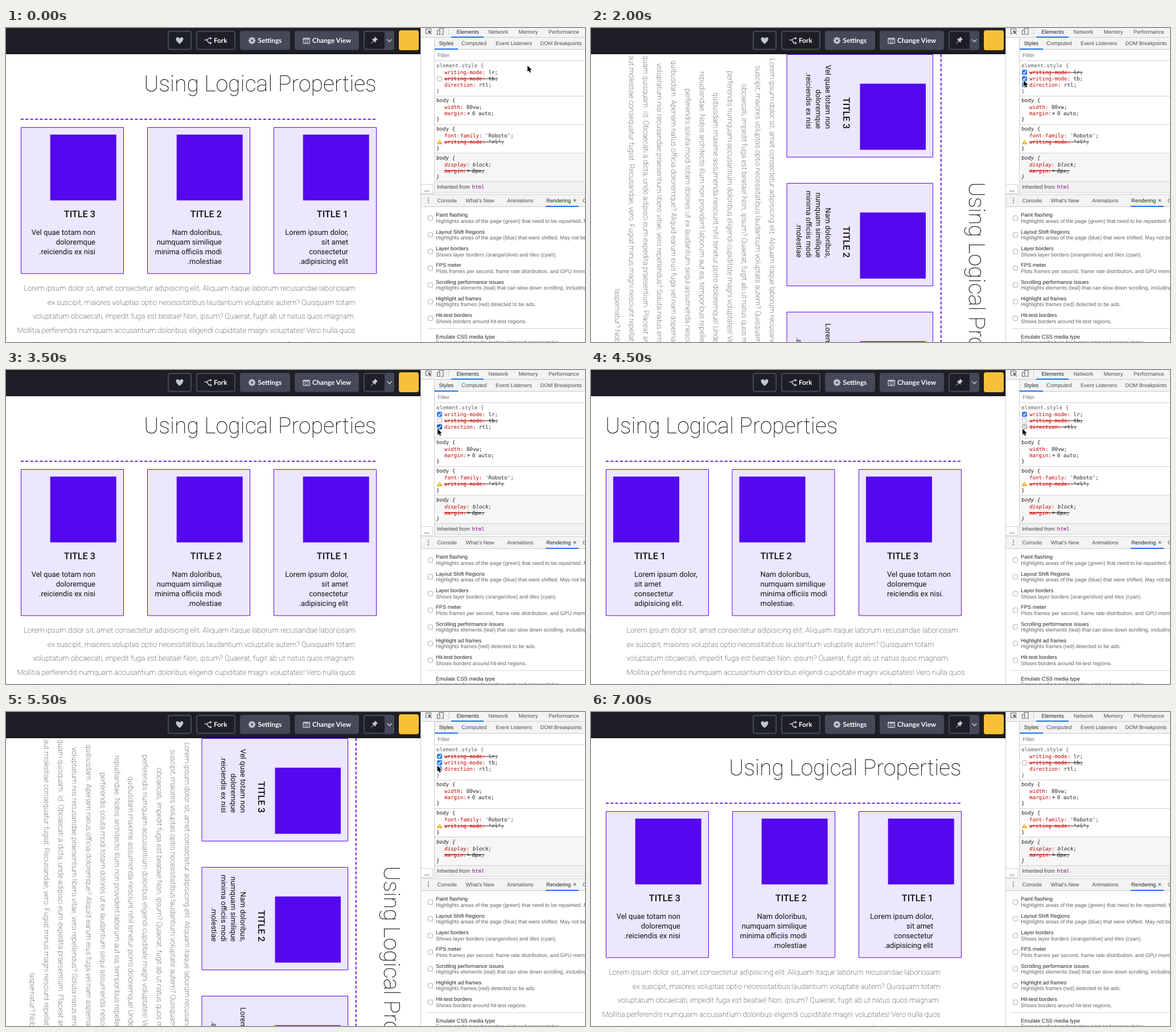
Write an HTML page with a canvas that moves like this. It is 1017 px wide and 551 px high and loops after 7500 ms.

```html
<!DOCTYPE html>
<html lang="en">
<head>
<meta charset="utf-8">
<title>Writing modes and direction</title>
<style>
html, body { margin: 0; width: 100%; height: 100%; overflow: hidden; background: #fff; }
canvas { display: block; }
</style>
</head>
<body>
<canvas id="stage" width="1017" height="551"></canvas>
<script>
const ctx = document.getElementById('stage').getContext('2d');
const LOOP = 7500;
const SANS = '"Liberation Sans", Arial, sans-serif';
const MONO = '"DejaVu Sans Mono", monospace';
const PAGE = 'Roboto, sans-serif';
const PURPLE = '#5408ee', RED = '#c80000', INK = '#222', BLUE = '#1a73e8';

// [start time, value...]; the last entry already reached applies
const MODES = [[0, 'rtl'], [2000, 'tb'], [2750, 'rtl'], [3750, 'ltr'], [4750, 'rtl'], [5500, 'tb'], [6250, 'rtl']];
const POINTER = [
  [0, 916, 66], [250, 878, 85], [500, 824, 85], [750, 771, 88], [1000, 770, 88], [1250, 760, 92],
  [3000, 757, 103], [3250, 758, 103], [5000, 758, 96], [5250, 758, 95], [5500, 757.5, 94],
  [6750, 966, 51], [7000, -50, -50]
];
const PRESSES = [[0, ''], [1750, 'tb'], [2000, ''], [3500, 'dir'], [3750, ''], [4500, 'dir'], [4750, '']];
const at = (list, t) => list.filter(e => e[0] <= t).pop();

const CARDS = [
  ['TITLE 1', 'Lorem ipsum dolor,', 'sit amet', 'consectetur', 'adipisicing elit.'],
  ['TITLE 2', 'Nam doloribus,', 'numquam similique', 'minima officiis modi', 'molestiae.'],
  ['TITLE 3', 'Vel quae totam non', 'doloremque', 'reiciendis ex nisi.']
];
const LINES = [
  'Lorem ipsum dolor sit, amet consectetur adipisicing elit. Aliquam itaque laborum recusandae laboriosam',
  'ex suscipit, maiores voluptas optio necessitatibus laudantium voluptate autem? Quisquam totam',
  'voluptatum obcaecati, impedit fuga est beatae! Non, ipsum? Quaerat, fugit ab ut natus quos magnam.',
  'Mollitia perferendis numquam accusantium doloribus eligendi cupiditate magni voluptates! Vero nulla quos',
  'quibusdam maxime assumenda nesciunt nihil tenetur porro doloremque! Unde perferendis repudiandae.'
];
const COLUMNS = [
  [53, LINES[0]],
  [66, 'suscipit, maiores voluptas optio necessitatibus laudantium voluptate autem? Quisquam totam voluptatum'],
  [98, 'obcaecati, impedit fuga est beatae! Non, ipsum? Quaerat, fugit ab ut natus quos magnam. Mollitia'],
  [75, 'perferendis numquam accusantium doloribus eligendi cupiditate magni voluptates! Vero nulla quos'],
  [113, 'quibusdam maxime assumenda nesciunt nihil tenetur porro doloremque! Unde perferendis'],
  [76, 'repudiandae. Nobis architecto illum non provident laborum aut ea, temporibus repellendus'],
  [106, 'perferendis soluta modi totam dolores ut ex laudantium sequi assumenda nesciunt'],
  [57, 'quibusdam. Aperiam natus officia doloremque? Aliquid earum eius fuga vel nam aspernatur'],
  [62, 'voluptatum nisi recusandae praesentium libero vitae, vero repellendus? Soluta natus error'],
  [48, 'quam quisquam. Id. Obcaecati a dicta, unde adipisci eum expedita praesentium. Placeat animi'],
  [48, 'aut molestiae consequatur fugiat. Recusandae, vero. Fugiat minus magni nesciunt repellat sit'],
  [457, '!aspernatur? Nobis magni']
];

function text(s, x, y, font, color = INK, align = 'left') {
  ctx.font = font;
  ctx.fillStyle = color;
  ctx.textAlign = align;
  ctx.fillText(s, x, y);
}

function box(x, y, w, h, color) {
  ctx.fillStyle = color;
  ctx.fillRect(x, y, w, h);
}

function round(x, y, w, h, r, fill, stroke, width = 1) {
  ctx.beginPath();
  ctx.roundRect(x, y, w, h, r);
  if (fill) { ctx.fillStyle = fill; ctx.fill(); }
  if (stroke) { ctx.strokeStyle = stroke; ctx.lineWidth = width; ctx.stroke(); }
}

function path(d, x, y, color, width) {
  const p = new Path2D(d);
  ctx.save();
  ctx.translate(x, y);
  if (width) {
    ctx.strokeStyle = color;
    ctx.lineWidth = width;
    ctx.stroke(p);
  } else {
    ctx.fillStyle = color;
    ctx.fill(p);
  }
  ctx.restore();
}

function card(x, rtl, [title, ...lines]) {
  round(x + 0.5, 174.5, 180, 256.5, 0, '#ece6fe', PURPLE);
  box(x + (rtl ? 51.7 : 13), 187, 116, 115.5, PURPLE);
  const edge = x + (rtl ? 131 : 50), align = rtl ? 'right' : 'left';
  text(title, edge, 332, '500 16.2px ' + PAGE, '#111', align);
  lines.forEach((s, i) => {
    // a closing full stop jumps to the far side in right-to-left text
    if (rtl && s.endsWith('.')) s = '.' + s.slice(0, -1);
    text(s, edge, 362.7 + i * 17.1, '13px ' + PAGE, '#111', align);
  });
}

function page(mode) {
  const tall = mode === 'tb', rtl = mode !== 'ltr';
  const shift = tall ? 28 : 0;
  ctx.save();
  ctx.beginPath();
  ctx.rect(0, 46, 729, 505);
  ctx.clip();
  if (tall) ctx.transform(0, 1, -1, 0, 775, 0);

  text('Using Logical Properties', rtl ? 650.5 + shift : 25, 111, '100 39.2px ' + PAGE, '#000', rtl ? 'right' : 'left');

  ctx.strokeStyle = PURPLE;
  ctx.lineWidth = 1.8;
  ctx.setLineDash([5, 3.35]);
  ctx.beginPath();
  ctx.moveTo(tall ? 46 : 26, 160.2);
  ctx.lineTo(651 + shift, 160.2);
  ctx.stroke();
  ctx.setLineDash([]);

  const order = rtl ? [...CARDS].reverse() : CARDS;
  const left = tall ? 46 : 26, step = tall ? 226 : 222;
  order.forEach((c, i) => card(left + i * step - (!rtl && i === 1 ? 0.5 : 0), rtl, c));

  const font = '100 13px ' + PAGE;
  if (tall) COLUMNS.forEach(([x, s], i) => text(s, x, 461 + i * 24.7, font, '#000'));
  else LINES.forEach((s, i) => text(s, rtl ? 613.5 : 62.5, 461 + i * 24.7, font, '#000', rtl ? 'right' : 'left'));
  ctx.restore();
}

function gear(x, y) {
  ctx.save();
  ctx.translate(x, y);
  ctx.fillStyle = '#c3c5cf';
  for (let i = 0; i < 8; i++) {
    ctx.fillRect(-1.4, -6.2, 2.8, 4);
    ctx.rotate(Math.PI / 4);
  }
  ctx.lineWidth = 3;
  ctx.strokeStyle = '#c3c5cf';
  ctx.beginPath();
  ctx.arc(0, 0, 3.4, 0, 7);
  ctx.stroke();
  ctx.restore();
}

function header() {
  const icon = '#c3c5cf', slate = '#444857', label = '700 11.7px Lato, sans-serif';
  box(0, 0, 729, 46, '#1e1f26');
  box(0, 42, 729, 4, '#191a20');
  for (const [x, w] of [[284, 42], [334, 69], [628, 54]])
    round(x + 1, 6, w - 2, 31.5, 3, '#1e1f26', slate, 2);
  for (const [x, w] of [[411, 88], [507, 113]]) round(x, 5, w, 33.5, 4, slate);
  round(665, 5, 17, 33.5, [0, 4, 4, 0], slate);

  path('M0 6 C-9 -1 -7 -6 -3.4 -5.8 Q-1 -5.6 0 -3.4 Q1 -5.6 3.4 -5.8 C7 -6 9 -1 0 6Z', 305, 22, icon);
  path('M0 -1.5 H3 C6 -1.5 6 4 9 4 H11 M3 -1.5 C6 -1.5 6 -4.5 9 -4.5 H11', 348.5, 22.5, icon, 1.7);
  path('M10 -7.2 L13.4 -4.5 L10 -1.8Z M10 1.3 L13.4 4 L10 6.7Z', 348.5, 22.5, icon);
  gear(432, 22);
  round(521.9, 17.9, 11.5, 9.4, 1, null, icon, 1.4);
  box(522, 18, 11.5, 2.4, icon);
  path('M-3.6 0 Q0 -4 3.6 0 Q0 4 -3.6 0Z', 527.7, 23.9, icon, 1);
  path('M1 -6.5 L6 -1.5 L4.6 -.8 L2.4 1.4 L2 4.4 L-1 1.6 L-5 6 L-5.8 6.4 L-5.4 5.2 L-1.8 .8 L-4.4 -2 L-1.4 -2.4 L.8 -4.6Z', 647, 21.5, icon);
  path('M-4 -2 L0 2 L4 -2', 673.5, 22, icon, 1.6);

  text('Fork', 365, 26, label, '#fff');
  text('Settings', 442.5, 26, label, '#fff');
  text('Change View', 538, 26, label, '#fff');
  round(690, 4, 35, 35, 4, '#f6c136');
}

function check(cx, cy, on, pressed) {
  if (on) {
    round(cx - 4.5, cy - 4.5, 9, 9, 2, pressed ? '#1558c0' : '#2f7bf2');
    path('M-2.4 .2 L-.7 2.2 L2.5 -2.4', cx, cy, '#fff', 1.4);
  } else {
    round(cx - 4, cy - 4, 8, 8, 1.8, pressed ? '#dcdcdc' : '#fff', pressed ? '#8a8a8a' : '#a9a9a9');
  }
}

function rule(name, value, y, { off = false, slant = false, short = false } = {}) {
  const font = (slant ? 'italic ' : '') + '9.2px ' + MONO;
  const x = 770, key = name + ':';
  text(key, x, y, font, RED);
  const keyEnd = x + ctx.measureText(key).width;
  const valueX = keyEnd + (short ? 10 : 5.5);
  text(value, valueX, y, font);
  const end = valueX + ctx.measureText(value).width;
  if (short) path('M0 -2.6 L4.4 0 L0 2.6Z', 811, y - 3.2, '#6e6e6e');
  if (off) {
    box(x, y - 3.5, keyEnd - x, 1, RED);
    box(keyEnd, y - 3.5, end - keyEnd, 1, INK);
  }
}

function styles(mode, hover, pressed) {
  const mono = '9.2px ' + MONO, tall = mode === 'tb';
  box(753, 220, 264, 49, '#f6f6f6');
  box(753, 270, 264, 18, '#f1f1f1');
  for (const y of [57, 119, 169, 219, 269, 288]) box(753, y, 264, 1, '#d0d0d0');

  text('element.style {', 756, 69, mono, '#5c5c5c');
  rule('writing-mode', 'lr;', 81, { off: tall });
  rule('writing-mode', 'tb;', 92, { off: !tall });
  rule('direction', 'rtl;', 103, { off: mode === 'ltr' });
  text('}', 756, 113.5, mono, '#5c5c5c');

  text('body {', 756, 130, mono);
  rule('width', '80vw;', 142.3);
  rule('margin', '0 auto;', 153, { short: true });
  text('}', 756, 163.3, mono);

  text('body {', 756, 180, mono);
  rule('font-family', "'Roboto';", 192.3);
  rule('writing-mode', '"rl";', 203, { off: true });
  text('}', 756, 213.7, mono);
  path('M0 -4.6 L4.8 4 H-4.8Z', 761.5, 200, '#f0ab1c');
  box(761, 197.6, 1.1, 3.6, '#fff');
  box(761, 202, 1.1, 1.1, '#fff');

  text('body {', 756, 230.5, 'italic ' + mono);
  rule('display', 'block;', 242.6, { slant: true });
  rule('margin', '8px;', 253.6, { off: true, slant: true, short: true });
  text('}', 756, 264, 'italic ' + mono);

  text('Inherited from', 757, 282, '9.4px ' + SANS, '#444');
  text('html', 818.5, 282.4, mono, '#881280');

  if (hover) check(761.5, 77.7, true);
  check(761.5, 89, tall, pressed === 'tb');
  if (hover) check(761.5, 99.7, mode !== 'ltr', pressed === 'dir');
}

function toolbars() {
  const tab = '9.4px ' + SANS, small = '9.25px ' + SANS, gray = '#4a4d51';
  box(729, 0, 288, 551, '#fff');
  box(729, 0, 288, 16, '#f3f3f3');
  box(729, 16, 288, 1, '#cbcbcb');
  box(753, 17, 264, 20, '#f3f3f3');
  box(753, 37, 264, 1, '#cbcbcb');
  box(782, 15, 57, 2, BLUE);
  box(753, 36, 41, 2, BLUE);
  box(752, 17, 1, 275, '#cbcbcb');
  box(777, 0, 1, 12, '#cbcbcb');

  path('M9 4 V1 H0 V9 H4', 737.5, 0.8, '#5f6368', 1.1);
  path('M0 0 L7 2.6 L4.4 3.9 L7 6.7 L6 7.6 L3.2 4.8 L2 7Z', 741, 4, '#5f6368');
  path('M4 3 V.5 H11 V11 H7 M.5 4 H5 V11 H.5Z', 757, 0.3, '#5f6368', 1.1);

  text('Elements', 791.5, 9.5, tab);
  text('Network', 847.5, 9.5, tab, gray);
  text('Memory', 900.5, 9.5, tab, gray);
  text('Performance', 953, 9.5, tab, gray);
  text('Styles', 760.5, 30.3, tab);
  text('Computed', 800, 30.3, '9.6px ' + SANS, gray);
  text('Event Listeners', 860, 30.3, small, gray);
  text('DOM Breakpoints', 938.5, 30.3, small, gray);
  text('Filter', 758, 51, '9.6px ' + SANS, '#757575');

  round(728.5, 274.5, 21, 16, 0, '#fff', '#d0d0d0');
  for (let i = 0; i < 3; i++) box(735.5 + i * 3, 285.5, 1.4, 1.4, '#333');
}

function drawer() {
  const tab = '9.4px ' + SANS, gray = '#4a4d51';
  box(729, 292, 288, 21, '#f3f3f3');
  box(729, 291.5, 288, 1, '#cbcbcb');
  box(729, 313, 288, 1, '#cbcbcb');
  box(948, 312, 58, 2, BLUE);
  for (let i = 0; i < 3; i++) box(741, 298 + i * 3.6, 1.7, 1.7, '#5f6368');
  text('Console', 757.5, 305.7, tab, gray);
  text("What's New", 807.5, 305.7, tab, gray);
  text('Animations', 880, 305.7, tab, gray);
  text('Rendering', 949, 305.7, tab);
  text('C', 1013, 305.7, tab, gray);
  path('M-2.2 -2.2 L2.2 2.2 M2.2 -2.2 L-2.2 2.2', 999, 302.5, '#5f6368', 1.1);

  const options = [
    ['Paint flashing', 'Highlights areas of the page (green) that need to be repainted. May not be'],
    ['Layout Shift Regions', 'Highlights areas of the page (blue) that were shifted. May not be suitable'],
    ['Layer borders', 'Shows layer borders (orange/olive) and tiles (cyan).'],
    ['FPS meter', 'Plots frames per second, frame rate distribution, and GPU memory.'],
    ['Scrolling performance issues', 'Highlights elements (teal) that can slow down scrolling, including touch'],
    ['Highlight ad frames', 'Highlights frames (red) detected to be ads.'],
    ['Hit-test borders', 'Shows borders around hit-test regions.']
  ];
  const font = '9.3px ' + SANS;
  options.forEach(([name, about], i) => {
    const y = 331.3 + i * 29.3;
    check(745.5, y + 2.3, false);
    text(name, 755, y, font);
    text(about, 755, y + 10.6, font, '#5f6368');
  });
  box(739, 527, 278, 1, '#d5d5d5');
  text('Emulate CSS media type', 755, 545, font);
  text('Forces media type for testing print and screen styles', 755, 554.5, font, '#5f6368');
}

function pointer(x, y) {
  const arrow = 'M0 0 V10.6 L2.4 8.4 L4.1 12.2 L6 11.4 L4.3 7.7 H7.6Z';
  path(arrow, x, y, '#fff', 1.8);
  path(arrow, x, y, '#000');
}

function draw(now) {
  const t = now % LOOP;
  const mode = at(MODES, t)[1];
  const hover = t >= 1250 && t < 7000;
  const [, px, py] = at(POINTER, t);
  ctx.textRendering = 'geometricPrecision';
  box(0, 0, 1017, 551, '#fff');
  page(mode);
  header();
  toolbars();
  styles(mode, hover, at(PRESSES, t)[1]);
  drawer();
  box(728, 0, 1, 551, '#cbcbcb');
  pointer(px, py);
}

const start = performance.now();
function loop() {
  draw(performance.now() - start);
  requestAnimationFrame(loop);
}
loop();
</script>
</body>
</html>
```
